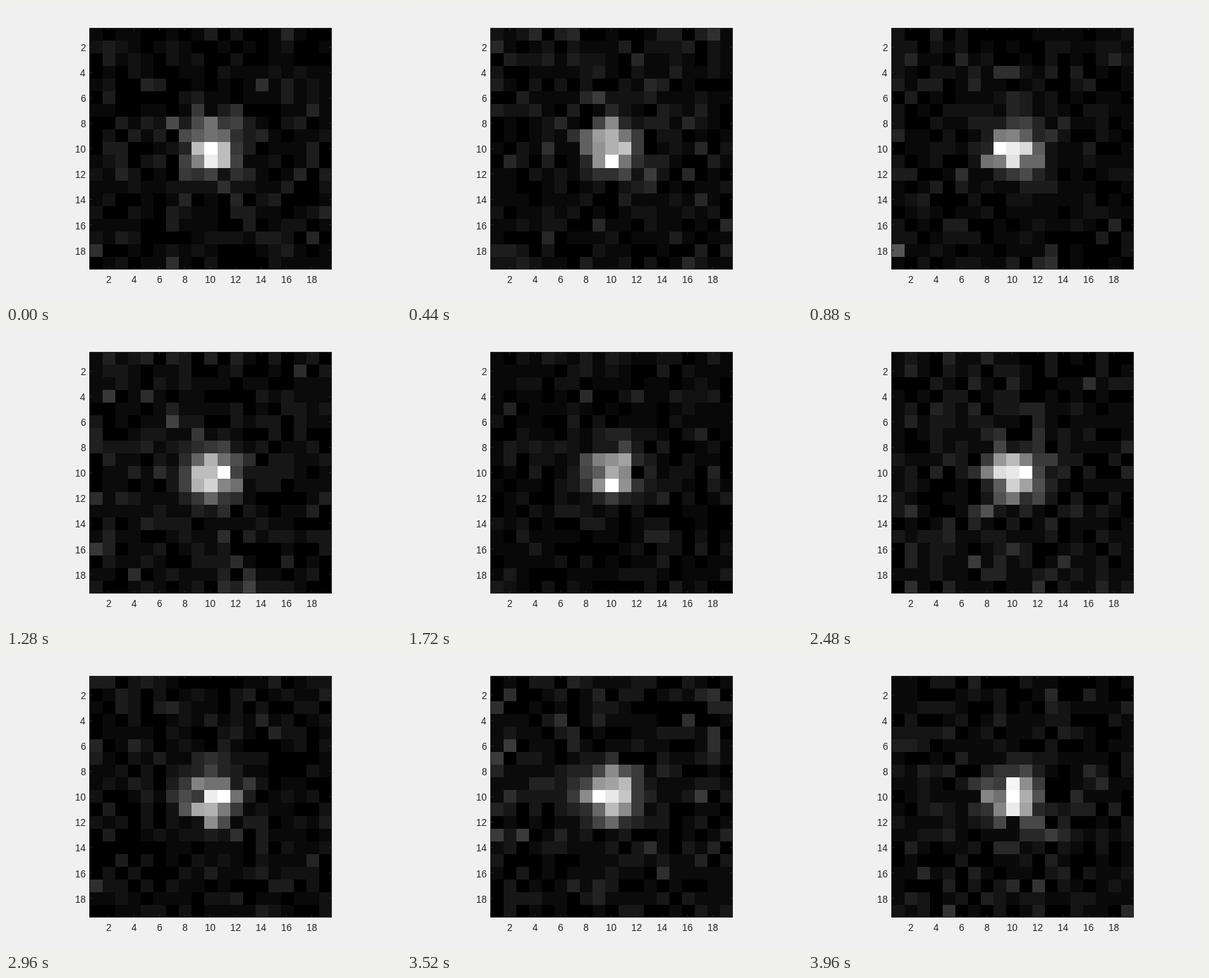
Recreate the animation shown at these times as a matplotlib script. Size 560 px wide and 420 px high, loop 4 s.

```python
import numpy as np
import matplotlib.pyplot as plt
from matplotlib.animation import FuncAnimation
from matplotlib.patches import Rectangle

W, H, DPI = 560, 420, 100
FRAMES, INTERVAL = 100, 40
N = 19                                   # cells per side
LEFT, RIGHT, TOP, BOTTOM = 118.6, 461.0, 31.5, 373.9
CELL = (RIGHT - LEFT) / N
INK = (0.15, 0.15, 0.15)
LINE = 72 / DPI                          # one pixel in points
TICK = 3.5

PEAK, SIGMA, BACKGROUND = 22.0, 1.27, 1.25

rows, cols = np.mgrid[1:N + 1, 1:N + 1]
spot = np.exp(-((cols - 10) ** 2 + (rows - 10) ** 2) / (2 * SIGMA ** 2))
expected = BACKGROUND + PEAK * spot


def exposure(i):
    """Photon counts of one noisy exposure, stretched to 0..1."""
    rng = np.random.default_rng(2100 + i)
    counts = rng.poisson(expected).astype(float)
    counts -= counts.min()
    return counts / counts.max()


fig = plt.figure(figsize=(W / DPI, H / DPI), dpi=DPI, facecolor="#f0f0f0")
ax = fig.add_axes([0, 0, 1, 1])
ax.axis("off")

image = ax.imshow(exposure(0), cmap="gray", vmin=0, vmax=1,
                  interpolation="nearest", aspect="auto",
                  extent=(LEFT, RIGHT, BOTTOM, TOP))
ax.set_xlim(0, W)
ax.set_ylim(H, 0)

# Pixel centres of the frame; snapping is off so they stay put.
x0, x1, y0, y1 = 118.5, 461.5, 31.5, 373.5
ax.add_patch(Rectangle((x0, y0), x1 - x0, y1 - y0, fill=False, snap=False,
                       edgecolor=INK, linewidth=LINE, joinstyle="miter"))


def tick(xs, ys):
    ax.plot(xs, ys, color=INK, linewidth=LINE, solid_capstyle="butt",
            snap=False)


def label(x, y, value, align):
    ax.text(x, y, str(value), ha=align, va="baseline", color=INK,
            family="Liberation Sans", fontsize=13.6 * LINE)


for value in range(2, N, 2):
    x = LEFT + (value - 0.5) * CELL
    y = TOP + (value - 0.5) * CELL
    px, py = np.floor(x) + 0.5, np.floor(y) + 0.5
    tick([px, px], [y0, y0 + TICK])
    tick([px, px], [y1, y1 - TICK])
    tick([x0, x0 + TICK], [py, py])
    tick([x1, x1 - TICK], [py, py])
    label(x - 0.3, 393, value, "center")
    label(112.7, y + 5.7, value, "right")


def update(i):
    image.set_data(exposure(i))
    return (image,)


anim = FuncAnimation(fig, update, frames=FRAMES, interval=INTERVAL,
                     repeat=True, repeat_delay=0, blit=False)
plt.show()
```
